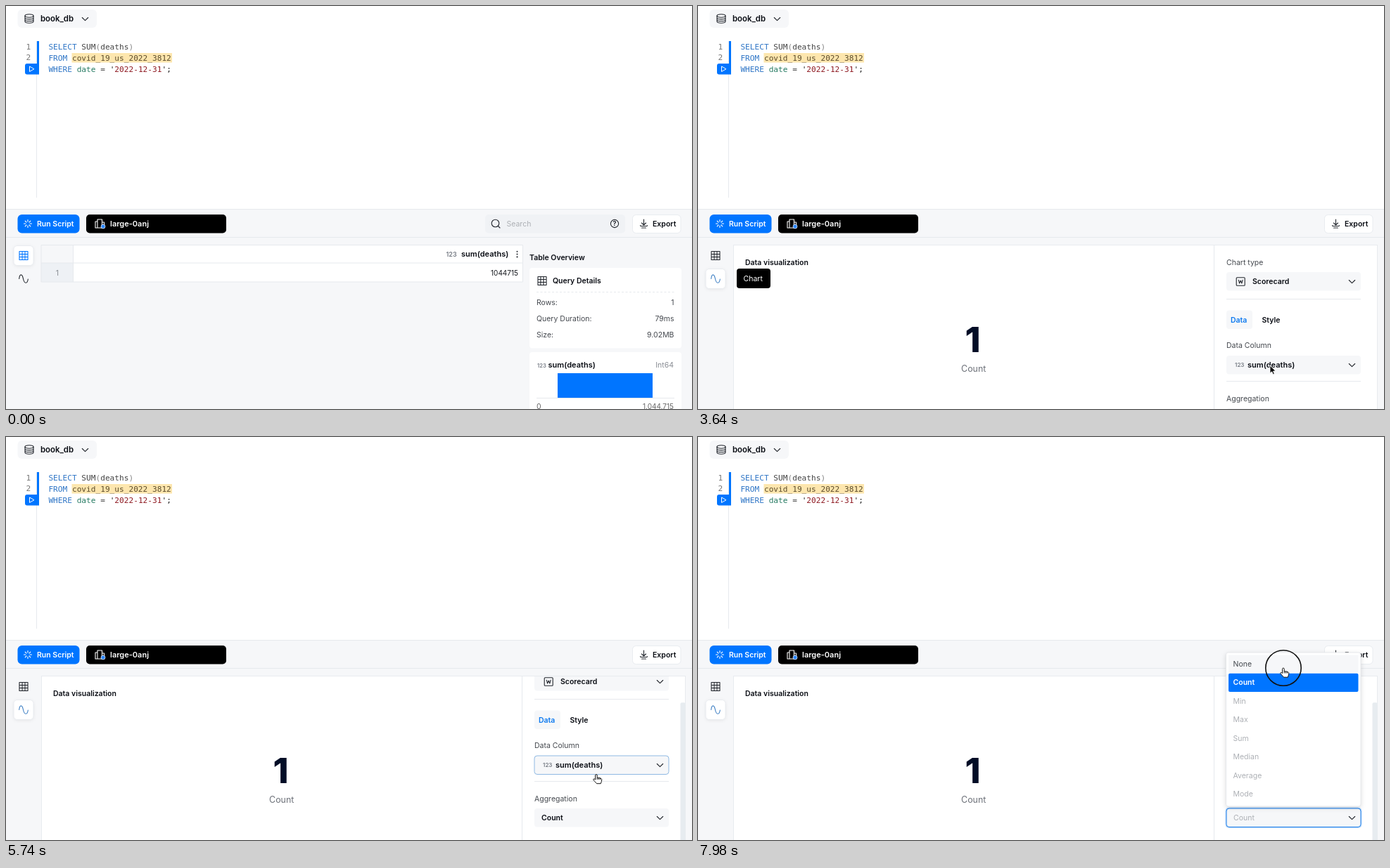
An HTML page that plays this animation: 975 px wide and 574 px high, repeating every 8 s.

```html
<!DOCTYPE html>
<html lang="en">
<head>
<meta charset="utf-8">
<title>Query result chart</title>
<style>
html, body { margin: 0; height: 100%; overflow: hidden; background: #fff; }
svg { display: block; width: 975px; height: 574px; }
text { font: 400 10.5px Inter, "Open Sans", sans-serif; fill: #45494f; white-space: pre; }
.b { font-weight: 600; fill: #0a0d14; }
.l { font-size: 11px; }
.w { fill: #fff; }
.e { text-anchor: end; }
.m { text-anchor: middle; }
.n { font-size: 8px; font-weight: 600; fill: #767b84; }
.g { fill: #888c93; }
.off { fill: #adb0b5; }
.code text { font: 11.15px "DejaVu Sans Mono", monospace; fill: #454545; }
.code .k { fill: #2e75c6; }
.ic { fill: none; stroke: #22262d; stroke-width: 1.1; stroke-linecap: round; stroke-linejoin: round; }
.line { fill: none; stroke: #e6e9ed; }
.tab { fill: #fff; stroke: #e9ecf0; filter: drop-shadow(0 1px 2px #0001); }
.field { fill: #f6f7f9; }
</style>
</head>
<body>
<svg viewBox="0 0 975 574">
<defs>
  <path id="chev" class="ic" d="M-4.2 -2L0 2.2L4.2 -2"/>
  <path id="grid" d="M-6 -6H6V6H-6ZM-6 -2H6M-6 2H6M-2 -6V6M2 -6V6"/>
  <rect id="field" class="field" x="751" width="191" height="26.5" rx="4"/>
  <clipPath id="pane"><rect x="734" y="341" width="232" height="233"/></clipPath>
</defs>

<!-- editor -->
<rect width="975" height="574" fill="#fff"/>
<rect class="field" x="16.5" y="5" width="112.5" height="26" rx="6"/>
<g class="ic">
  <ellipse cx="33" cy="14" rx="6" ry="2.2"/>
  <path d="M27 14V22C27 25 39 25 39 22V14M27 16.7C27 19.6 39 19.6 39 16.7M27 19.4C27 22.3 39 22.3 39 19.4"/>
</g>
<text class="b" x="49" y="21.8" style="font-size:11.4px">book_db</text>
<use href="#chev" x="112.5" y="18.5"/>
<path class="line" d="M43.5 50V273"/>
<path fill="#0075ff" d="M44 50H47V97.5H30Q27 97.5 27 94.5V85Q27 82 30 82H44Z"/>
<path d="M33.5 86L40 89.7L33.5 93.4Z" fill="none" stroke="#fff"/>
<rect x="93.5" y="67" width="142.5" height="13.5" fill="#fde6ae"/>
<g class="code">
  <text x="28.5" y="61.8" style="fill:#777">1</text>
  <text x="28.5" y="77.4" style="fill:#777">2</text>
  <text x="60.4" y="61.8"><tspan class="k">SELECT</tspan> SUM<tspan fill="#888">(</tspan>deaths<tspan fill="#888">)</tspan></text>
  <text x="60.4" y="77.6"><tspan class="k">FROM</tspan> <tspan fill="#5c4c2c">covid_19_us_2022_3812</tspan></text>
  <text x="60.4" y="93.5"><tspan class="k">WHERE</tspan> <tspan fill="#277b63">date</tspan> = <tspan fill="#222">'</tspan><tspan fill="#8f1a22">2022-12-31</tspan><tspan fill="#222">';</tspan></text>
</g>

<!-- toolbar -->
<rect class="field" y="289" width="975" height="285"/>
<path class="line" d="M0 289.5H975M0 329.5H975"/>
<rect x="16.5" y="297" width="88" height="26.5" rx="6" fill="#0075ff"/>
<path class="ic" style="stroke:#fff" d="M31 304.5V307M31 313V315.5M25.5 310H28M34 310H36.5M27.2 306.2L29 308M33 312L34.8 313.8M34.8 306.2L33 308M29 312L27.2 313.8"/>
<text class="b w" x="44" y="313.8">Run Script</text>
<rect x="114" y="297" width="199" height="26.5" rx="5"/>
<path class="ic" style="stroke:#fff" d="M130 304H136.5V316H130ZM130 307H127V316H130M136.5 308H139.5V312"/>
<circle cx="138" cy="314" r="3" fill="#2a86ff" stroke="#fff" stroke-width=".7"/>
<text class="b w l" x="148" y="313.8">large-0anj</text>
<g id="search">
  <rect x="681" y="297" width="199" height="26.5" rx="5" fill="#f0f2f5"/>
  <g class="ic"><circle cx="695.5" cy="309.5" r="5.3"/><path d="M699.5 313.5L702 316"/><circle cx="865" cy="310" r="5.6"/></g>
  <text class="off" x="711.5" y="313.8">Search</text>
  <text class="b m" x="865" y="313.2" style="font-size:9px">?</text>
</g>
<rect x="890.5" y="297.5" width="68.5" height="26" rx="5" fill="#fff" stroke="#e9ecf0"/>
<path class="ic" d="M906.5 304V312M903.5 309L906.5 312L909.5 309M901.5 312.5Q901.5 313.5 902.5 313.5H910.5Q911.5 313.5 911.5 312.5M903.5 316H909.5"/>
<text class="b" x="919" y="313.8">Export</text>

<!-- view switch -->
<rect id="tabTable" class="tab" x="11" y="341.5" width="28" height="28" rx="5"/>
<rect id="tabChart" class="tab" x="11" y="374.5" width="28" height="28" rx="5"/>
<use id="icoTable" class="ic" href="#grid" x="25" y="355.5"/>
<path id="icoChart" class="ic" d="M18.7 388.5C19.5 381 23 381 24.5 388.5S30.5 396 31.3 389"/>

<!-- table view -->
<g id="table">
  <rect x="95.5" y="340.5" width="639" height="52.5" fill="#fff"/>
  <rect x="50" y="366" width="45.5" height="27" fill="#eef1f5"/>
  <path class="line" d="M50 340.5H734.5V393H50ZM50 366H734.5M95.5 340.5V393"/>
  <text class="n" x="625.5" y="356.7" style="font-size:9px">123</text>
  <text class="b l" x="647" y="357">sum(deaths)</text>
  <path class="ic" d="M726.5 349.7v.1M726.5 353.5v.1M726.5 357.3v.1" style="stroke-width:2"/>
  <text class="m g" x="73" y="383.5">1</text>
  <text class="e" x="728" y="383.5" style="font-size:10px;fill:#14171c">1044715</text>
  <text class="b" x="744" y="361.7">Table Overview</text>
  <rect x="744" y="373" width="216" height="114.5" rx="4" fill="#fff"/>
  <use class="ic" href="#grid" x="762" y="391.5"/>
  <text class="b" x="777" y="395.2">Query Details</text>
  <path class="line" stroke-dasharray="3 2.5" d="M754 407.5H950"/>
  <text x="754" y="425.8">Rows:</text><text class="e" x="949.5" y="425.8">1</text>
  <text x="754" y="449">Query Duration:</text><text class="e" x="949.5" y="449">79ms</text>
  <text x="754" y="472">Size:</text><text class="e" x="949.5" y="472">9.02MB</text>
  <rect x="744" y="493" width="216" height="90" rx="4" fill="#fff"/>
  <text class="n" x="755" y="514.7" style="font-size:7.6px">123</text>
  <text class="b l" x="770.5" y="515">sum(deaths)</text>
  <text class="e g" x="949" y="515">Int64</text>
  <rect x="784" y="523" width="135" height="35" fill="#0075ff"/>
  <path class="line" d="M754 558.5H950"/>
  <text x="754" y="573.6" style="fill:#666">0</text><text class="e" x="949" y="573.6" style="fill:#666;font-size:10px">1,044,715</text>
</g>

<!-- chart view -->
<g id="chart">
  <rect x="50.5" y="340.5" width="915" height="240" fill="#fff" stroke="#e8ebef"/>
  <path class="line" d="M733.5 341V574"/>
  <text class="b" x="67" y="369.3">Data visualization</text>
  <text class="m" x="390.5" y="493" style="font-size:50px;font-weight:800;fill:#020d26">1</text>
  <text class="m" x="391.7" y="521" style="font-size:12.4px;fill:#6c7078">Count</text>
  <g clip-path="url(#pane)">
    <g id="scroll">
      <text x="751" y="368.7">Chart type</text>
      <use href="#field" y="379"/>
      <rect class="ic" x="765.2" y="386.7" width="12" height="11.6" rx="1"/>
      <path class="ic" d="M768.3 390.2L769.6 395L771.2 391L772.8 395L774.1 390.2"/>
      <text class="b" x="788" y="396">Scorecard</text>
      <use href="#chev" x="929.5" y="392.5"/>
      <rect class="field" x="751" y="433.5" width="37" height="26.5" rx="4"/>
      <text class="b" x="757" y="450.8" style="fill:#0a78ef">Data</text>
      <text class="b" x="801.5" y="450.8">Style</text>
      <text x="751" y="487.2">Data Column</text>
      <use href="#field" id="column" y="498"/>
      <text class="n" x="763" y="514">123</text>
      <text class="b l" x="781" y="514.8">sum(deaths)</text>
      <use href="#chev" x="929.5" y="511.5"/>
      <path class="line" d="M751 417.5H942M751 534.5H942"/>
      <text x="751" y="562.7">Aggregation</text>
      <rect id="glow" x="749.5" y="571.5" width="194" height="29.5" rx="5" fill="#b9d9fc"/>
      <use href="#field" id="aggregate" y="573"/>
      <text id="picked" class="b" x="761" y="590.2">Count</text>
      <use href="#chev" x="929.5" y="586.5"/>
    </g>
    <rect id="thumb" x="958.5" width="7" height="211" rx="2" fill="#e7ecf0"/>
  </g>
</g>

<g id="menu">
  <rect x="750.5" y="307" width="191.5" height="219" rx="3" fill="#fff" stroke="#e6e8eb" style="filter:drop-shadow(0 2px 3px #0002)"/>
  <rect id="none" class="field" x="754" y="310.5" width="184.5" height="26"/>
  <rect x="754" y="336.7" width="184.5" height="26.3" rx="2" fill="#0075ff"/>
</g>

<g id="tip">
  <rect x="55" y="374" width="48" height="28" rx="4"/>
  <text class="w" x="64.5" y="391.5">Chart</text>
</g>

<g id="cursor">
  <circle id="ring" r="25.2" fill="none" stroke="#111" stroke-width="1.6"/>
  <path id="arrow" d="M0 0V11.2L2.6 8.8L4.4 12.8L6.3 12L4.6 8.1H8Z" stroke="#fff" stroke-width=".9"/>
  <path id="hand" d="M-1.4 7.6V1.4A1.3 1.3 0 0 1 1.2 1.4V5C3.5 4.6 7.2 5.2 7.6 6.8C8 9 7 11 6.3 13.2H.5C-.8 11.2 -3.8 9 -4.2 7.5C-4.3 6 -2.6 6.2 -1.4 7.6ZM1.2 5V7.5M3.4 5.2V7.5M5.5 5.5V7.5" fill="#fff" stroke="#111" stroke-linejoin="round"/>
</g>
</svg>
<script>
const LOOP = 8000, STEP = 70, BLUE = '#0075ff', INK = '#22262d';
const $ = id => document.getElementById(id);
const clamp = v => Math.min(1, Math.max(0, v));
const smooth = v => v * v * (3 - 2 * v);
const ramp = (t, from, to) => smooth(clamp((t - from) / (to - from)));
const show = (id, v) => $(id).setAttribute('opacity', +v);
const move = (id, x, y) => $(id).setAttribute('transform', `translate(${x} ${y})`);

['None', 'Count', 'Min', 'Max', 'Sum', 'Median', 'Average', 'Mode'].forEach((name, i) => {
  const el = document.createElementNS('http://www.w3.org/2000/svg', 'text');
  el.textContent = name;
  el.setAttribute('x', 760.5);
  el.setAttribute('y', 327 + i * 26.45);
  el.setAttribute('class', ['', 'b w'][i] ?? 'off');
  $('menu').append(el);
});

// cursor stops: time, x, y
const path = [
  [420, 335, 546], [1190, 25, 390], [2800, 25, 390], [3150, 752, 482], [3290, 752, 482],
  [3640, 813, 512], [4130, 820, 493], [5390, 820, 493], [5740, 839, 480.5],
  [6230, 841, 543.5], [7140, 841, 543.5], [7840, 832, 329]
];

function cursorAt(t) {
  const i = path.findIndex(p => p[0] > t);
  if (i < 0) return path.at(-1).slice(1);
  const b = path[i], a = path[i - 1] || b, k = ramp(t, a[0], b[0]);
  return [a[1] + (b[1] - a[1]) * k, a[2] + (b[2] - a[2]) * k];
}

function draw(t) {
  const [x, y] = cursorAt(t);
  const chart = t >= 2170, open = t >= 6580, focus = t >= 6510, hand = t >= 5530;

  show('table', !chart);
  show('search', !chart);
  show('tabTable', !chart);
  show('chart', chart);
  show('tabChart', ramp(t, 1190, 1610));
  $('icoTable').style.stroke = chart ? INK : BLUE;
  $('icoChart').style.stroke = chart ? '#3d7fc4' : INK;
  show('tip', ramp(t, 2240, 2450) * (1 - ramp(t, 3710, 3920)));

  // overscroll, then spring back
  const scroll = 52 * ramp(t, 4130, 4620) - 8 * ramp(t, 4690, 5040);
  move('scroll', 0, -scroll);
  $('thumb').setAttribute('y', 341 + scroll * .845);
  show('thumb', t >= 4060);

  $('column').style.stroke = hand && y < 484 && t < 5950 ? '#8fb9e3' : 'none';
  $('aggregate').style.stroke = focus ? '#1f7fe8' : hand && y > 529 ? '#8fb9e3' : 'none';
  show('glow', ramp(t, 6510, 7000));
  $('picked').setAttribute('class', focus ? 'off' : 'b');
  show('menu', open ? ramp(t, 6510, 6720) : 0);
  show('none', y < 337);

  move('cursor', x, y);
  show('cursor', t >= 420);
  show('arrow', !hand);
  show('hand', hand);
  show('ring', t >= 7980 || t >= 6510 && t < 6650);
}

function tick() {
  const t = performance.now() % LOOP;
  draw(Math.floor(t / STEP) * STEP);
  requestAnimationFrame(tick);
}
tick();
</script>
</body>
</html>
```
